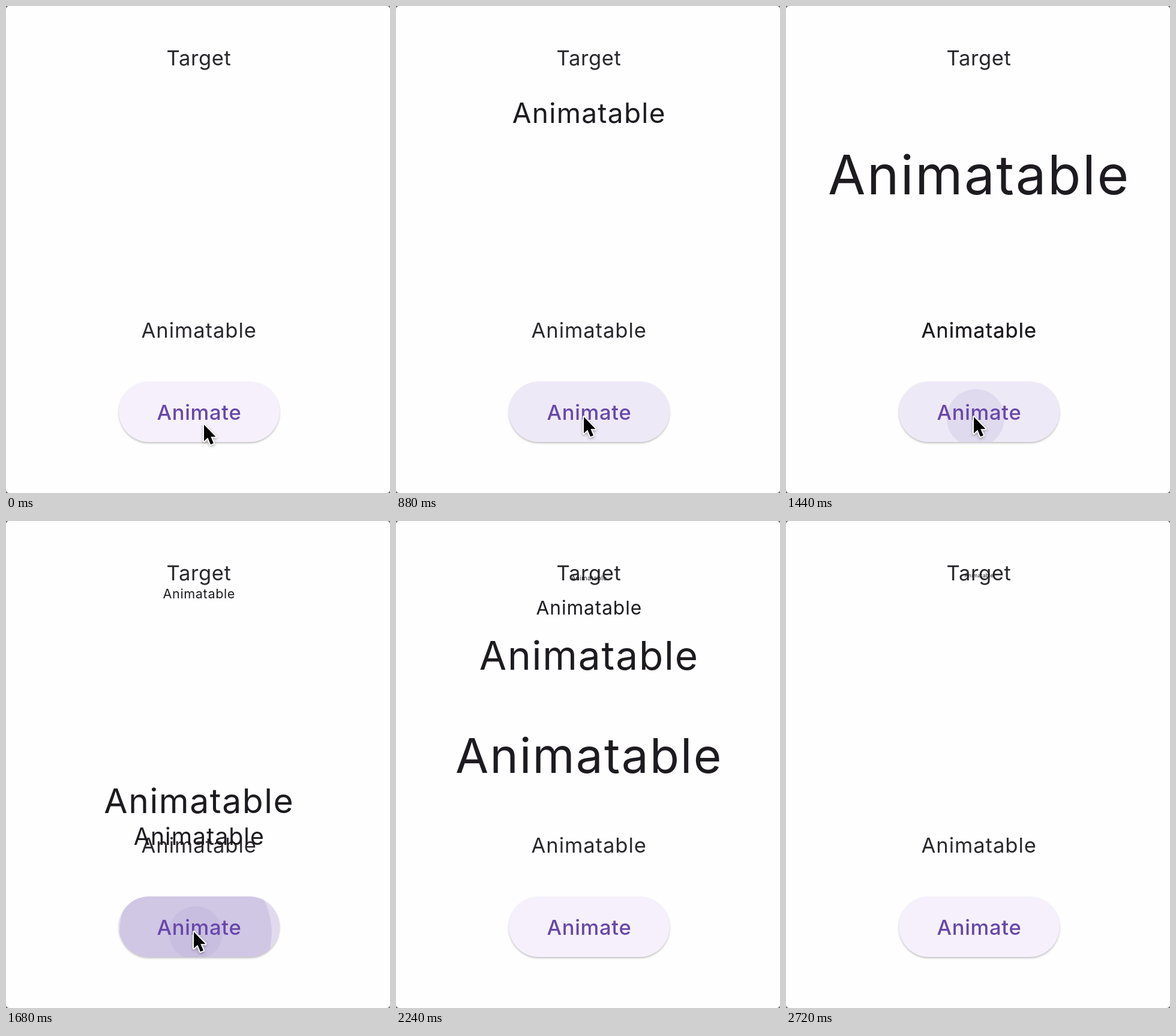
These frames come from a looping animation (640 px wide and 812 px high, 2760 ms). An HTML page:

```html
<!DOCTYPE html>
<html lang="en">
<head>
<meta charset="utf-8">
<title>Animate</title>
<style>
@property --p { syntax: "<number>"; inherits: false; initial-value: 0; }

:root { --loop: 2760ms; }
html, body { margin: 0; width: 100%; height: 100%; overflow: hidden; background: #fff; }
svg { display: block; width: 640px; height: 812px; background: #5c5c5c; }

text {
  font: 400 34.6px Inter, "Open Sans", sans-serif;
  letter-spacing: .95px;
  text-anchor: middle;
  fill: #2a282d;
}
.title { letter-spacing: .6px; }
.label { font-weight: 500; letter-spacing: .7px; fill: #6847a9; }

/* Copies grow threefold up to half way, then shrink into the title. */
.copy {
  opacity: 0;
  transform: translate(321.8px, calc(541px - 454px * var(--p)))
             scale(min(1 + 4 * var(--p), 5.8 - 5.6 * var(--p)));
  animation: fly var(--loop) var(--at) infinite;
}
.copy text { fill: #1d1b20; }
@keyframes fly {
  0% { --p: 0; opacity: 1; animation-timing-function: ease-in-out; }
  32.609% { --p: 1; opacity: 1; }
  32.61%, 100% { --p: 1; opacity: 0; }
}

.button { fill: #f5f0fb; filter: drop-shadow(0 2px 1.5px rgba(0, 0, 0, .24)); }
.hover { fill: #6750a4; opacity: 0; animation: hover var(--loop) linear infinite; }
@keyframes hover {
  0%, 23.2% { opacity: 0; }
  26%, 70.2% { opacity: .045; }
  72%, 100% { opacity: 0; }
}

/* The pointer goes down 45 ms before each copy starts. */
.ripple {
  fill: #6750a4;
  opacity: 0;
  animation: grow var(--loop) calc(var(--at) - 45ms) infinite,
             tint var(--loop) calc(var(--at) - 45ms) linear infinite;
}
@keyframes grow {
  0% { r: 43px; animation-timing-function: linear; }
  1.63% { r: 45px; animation-timing-function: ease; }
  9.783%, 100% { r: 145px; }
}
@keyframes tint {
  0% { opacity: 0; }
  2.717% { opacity: .13; }
  9.783% { opacity: .13; animation-timing-function: ease-out; }
  15.217%, 100% { opacity: 0; }
}

.cursor {
  filter: drop-shadow(0 2px 2px rgba(0, 0, 0, .3));
  animation: point var(--loop) ease-in-out infinite;
}
.cursor path { stroke: #fff; stroke-width: 4px; stroke-linejoin: round; paint-order: stroke; }
@keyframes point {
  0% { transform: translate(330px, 698px); }
  6.5%, 22% { transform: translate(320px, 677px); }
  32%, 69% { transform: translate(313px, 685px); animation-timing-function: ease-in; }
  72.46% { transform: translate(314px, 748px); animation-timing-function: linear; }
  75.4%, 100% { transform: translate(317px, 830px); }
}
</style>
</head>
<body>
<svg viewBox="0 0 640 812">
  <defs>
    <clipPath id="pill"><rect x="188" y="626" width="268" height="101" rx="50.5"/></clipPath>
  </defs>
  <rect width="640" height="812" rx="5" fill="#fefefe"/>
  <text class="title" x="321.5" y="99">Target</text>
  <text x="321.7" y="553">Animatable</text>

  <rect class="button" x="188" y="626" width="268" height="101" rx="50.5"/>
  <g id="ripples" clip-path="url(#pill)">
    <rect class="hover" x="188" y="626" width="268" height="101"/>
  </g>
  <text class="label" x="322" y="690">Animate</text>

  <g id="copies"></g>
  <g class="cursor"><path d="M0 0V27.5L6.3 21.8L11 33L16 31L11.3 20.2H19.5Z"/></g>
</svg>
<script>
const add = (parent, tag, attrs) => {
  const el = document.createElementNS("http://www.w3.org/2000/svg", tag);
  for (const name in attrs) el.setAttribute(name, attrs[name]);
  return document.getElementById(parent).appendChild(el);
};

const clicks = [261, 955, 1430, 1565, 1685, 1883];
for (const at of clicks) {
  const style = `--at: ${at}ms`;
  add("ripples", "circle", { class: "ripple", cx: 316, cy: 687, style });
  add("copies", "g", { class: "copy", style }).innerHTML = '<text y="12">Animatable</text>';
}
</script>
</body>
</html>
```
